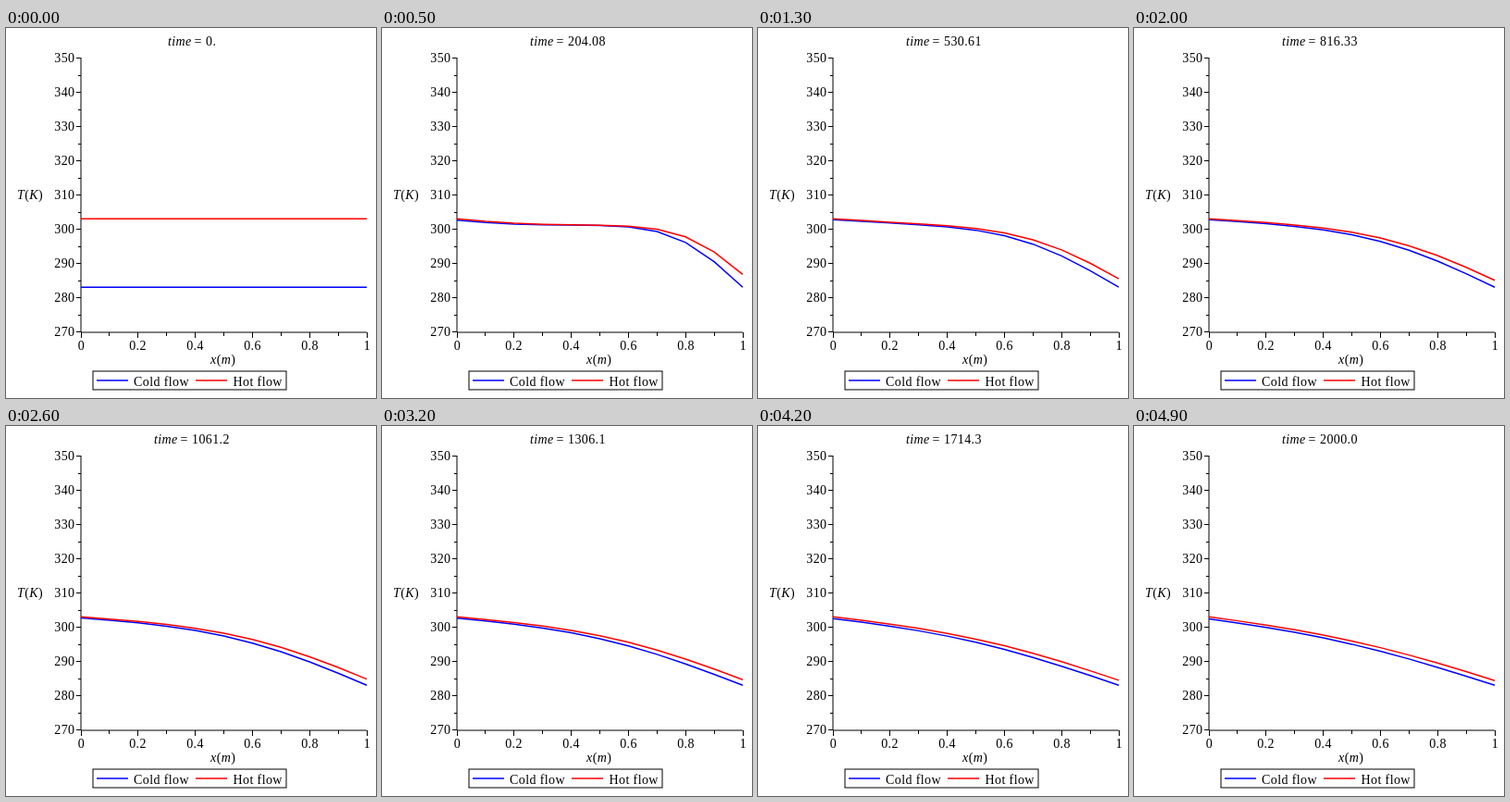
Write an HTML page that moves like this. It is 400x400 px and loops after 5000 ms.

```html
<!DOCTYPE html>
<html lang="en">
<head>
<meta charset="utf-8">
<title>Counterflow temperatures</title>
<style>
html, body { margin: 0; width: 100%; height: 100%; overflow: hidden; background: #fff; }
svg { display: block; width: 400px; height: 400px; }
text { font: 14px "Liberation Serif", "Times New Roman", serif; letter-spacing: .4px; white-space: pre; }
.it { font-style: italic; }
</style>
</head>
<body>
<svg id="plot" viewBox="0 0 400 400"></svg>
<script>
const plot = document.getElementById('plot');
const BLUE = '#00f', RED = '#f00';
const px = x => 81 + 309 * x;
const py = T => 328.3 - 3.7 * (T - 270);

function add(tag, attrs, content = '') {
  const el = document.createElementNS('http://www.w3.org/2000/svg', tag);
  for (const name in attrs) el.setAttribute(name, attrs[name]);
  el.textContent = content;
  return plot.appendChild(el);
}
const label = (x, y, content, cls = '', anchor = 'start') =>
  add('text', { x, y, class: cls, 'text-anchor': anchor }, content);
const path = (d, stroke, width) =>
  add('path', { d, stroke, 'stroke-width': width, fill: 'none' });

// Axes and ticks
let axes = 'M81 32V329H390';
for (let T = 270; T <= 350; T += 5) {
  const y = Math.round(py(T)) + .5, major = T % 10 === 0;
  axes += `M81 ${y}h${major ? -5 : -3}`;
  if (major) label(74.5, y + 4.5, T, '', 'end');
}
for (let i = 0; i <= 10; i++) {
  const x = Math.floor(px(i / 10)) + .5, major = i % 2 === 0;
  axes += `M${x} 329v${major ? 6 : 4}`;
  if (major) label(x, 348, i / 10, '', 'middle');
}
path(axes, '#000', 1);

// Axis names such as T(K): quantity and unit in italics, brackets upright
function axisName(x, y, parts) {
  const name = label(x, y, '');
  parts.forEach((part, i) => {
    const span = add('tspan', { class: i % 2 ? '' : 'it' }, part);
    name.appendChild(span);
  });
}
axisName(12, 185, ['T', '(', 'K', ')']);
axisName(221, 363, ['x', '(', 'm', ')']);

// Legend
add('rect', { x: 94, y: 371, width: 209, height: 20, fill: 'none', stroke: '#000' });
path('M98 381H132', BLUE, 1.5);
path('M205 381H239', RED, 1.5);
label(138, 387, 'Cold flow');
label(245.5, 387, 'Hot flow');

const cold = path('', BLUE, 1.5), hot = path('', RED, 1.5);
const title = [label(0, 19, 'time', 'it'), label(0, 19, '='), label(0, 19, '')];

// Diffusion series: hot inlet fixed at x = 0, cold inlet fixed at x = 1
const HOT = 303, COLD = 283, MIXED = 301.16, L = .051;
const slope = (HOT - COLD) / (1 + L);
const modes = Array.from({ length: 40 }, (_, n) => {
  let k = (n + 1) * Math.PI;
  for (let i = 0; i < 30; i++) k = (n + 1) * Math.PI - Math.atan(L * k);
  const s = Math.sin(k), c = Math.cos(k);
  const part = (MIXED - HOT) * (1 - c) / k + slope * (s / k - c) / k;
  return { k, amp: part / (.5 - Math.sin(2 * k) / (4 * k)) };
});

function temperatures(x, t) {
  if (!t) return [COLD, HOT];
  const spread = 8e-5 * t + .0009 * (1 - Math.exp(-t / 80));
  let T = HOT - slope * x, grad = -slope;
  for (const { k, amp } of modes) {
    const a = amp * Math.exp(-k * k * spread);
    T += a * Math.sin(k * x);
    grad += a * k * Math.cos(k * x);
  }
  return [T + L * grad, T];
}

function draw(step) {
  const t = step * 2000 / 49;
  const points = [[], []];
  for (let i = 0; i <= 10; i++)
    temperatures(i / 10, t).forEach((T, j) => points[j].push(`${px(i / 10)} ${py(T)}`));
  cold.setAttribute('d', 'M' + points[0].join('L'));
  hot.setAttribute('d', 'M' + points[1].join('L'));

  const left = step ? 160 : 175;
  [0, 28.5, 41].forEach((dx, i) => title[i].setAttribute('x', left + dx));
  title[2].textContent = step ? t.toPrecision(5) : '0.';
}

let shown = -1;
function tick() {
  const step = Math.floor(performance.now() % 5000 / 100);
  if (step !== shown) draw(shown = step);
  requestAnimationFrame(tick);
}
tick();
</script>
</body>
</html>
```
